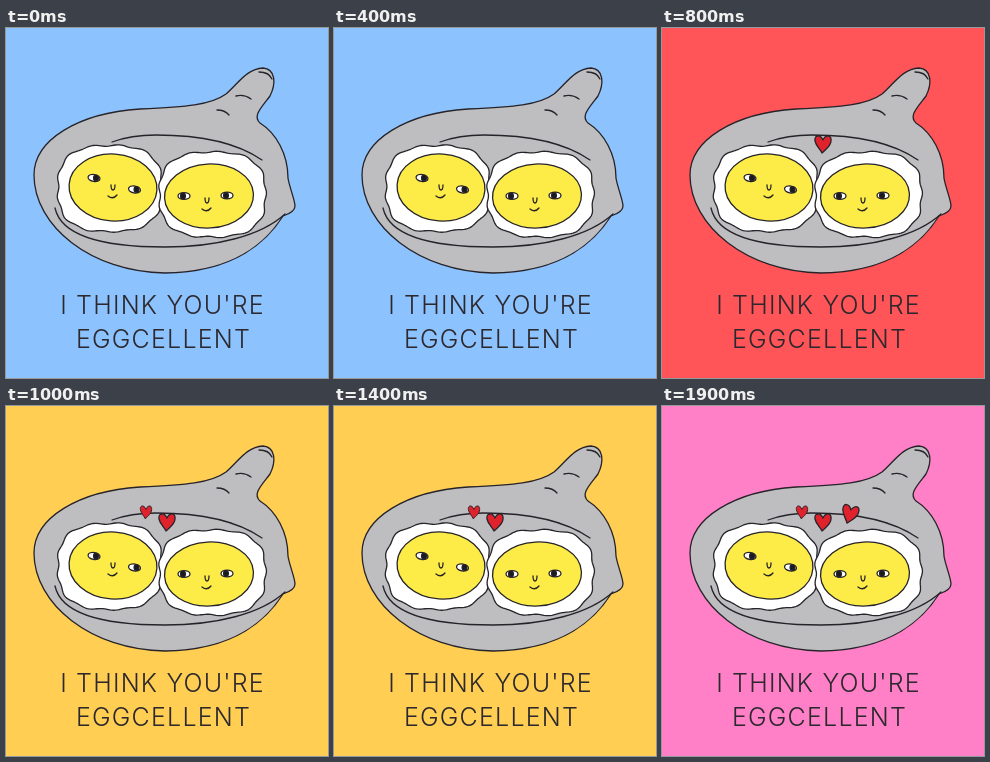
Write an HTML page that moves like this. It is 322x350 px and loops after 2000 ms.

```html
<!DOCTYPE html>
<html lang="en">
<head>
<meta charset="utf-8">
<title>Eggcellent</title>
<style>
  html, body { margin: 0; width: 100%; height: 100%; overflow: hidden; }
  svg { display: block; width: 100%; height: 100%; }
  .ink { fill: none; stroke: #262329; stroke-width: 1.3; stroke-linecap: round; stroke-linejoin: round; }
  .pan { fill: #bebec1; }
  .white { fill: #fff; }
  .yolk { fill: #fdec48; }
  .pupil { fill: #1c1a1e; }
  .heart { fill: #e0222d; }
  text { font: 300 25px Inter, Lato, sans-serif; letter-spacing: 1.2px; text-anchor: middle; fill: #2c282e; }
</style>
</head>
<body>
<svg viewBox="0 0 322 350">
  <defs>
    <path id="heart" d="M0-4C-3-10-9-9-8-3C-7 2-3 5-1 9C3 5 8 2 8-3C9-9 3-10 0-4Z"/>
  </defs>
  <rect id="backdrop" width="322" height="350"/>

  <g class="ink">
    <path class="pan" d="M28 147C28 112 72 85 134 81C180 79 205 77 220 66
      C232 56 240 41 257 40C270 41 270 56 264 68C256 79 246 88 254 95
      C270 105 282 126 282 150C283 158 289 172 289 178Q289 184 277 188
      C262 212 230 244 159 245C85 244 28 198 28 147Z"/>
    <!-- Rim and handle creases -->
    <path d="M106 114Q125 107 150 107C190 107 230 114 256 132"/>
    <path d="M49 180C56 212 110 219 159 219C210 219 255 208 279 186"/>
    <path d="M253 44Q263 44 266 51M230 68Q238 66 245 71M211 82Q219 82 223 87"/>
  </g>

  <g id="eggs" class="ink"></g>

  <g id="hearts" class="ink heart">
    <use href="#heart" transform="translate(161 116)"/>
    <use href="#heart" transform="translate(140 106) scale(.7 .76)"/>
    <use href="#heart" transform="translate(188 108) rotate(12) scale(1 1.06)"/>
  </g>

  <text x="156.500" y="286">I THINK YOU'RE</text>
  <text x="157.500" y="320">EGGCELLENT</text>
</svg>
<script>
const LOOP = 2000, SCENE = 500;
const backdrops = ['#8cc2fd', '#ff5458', '#ffce52', '#ff80c7'];
const backdrop = document.getElementById('backdrop');
const eggs = document.getElementById('eggs');
const hearts = [...document.getElementById('hearts').children];

function add(tag, attributes) {
  const node = document.createElementNS('http://www.w3.org/2000/svg', tag);
  for (const key in attributes) node.setAttribute(key, attributes[key]);
  eggs.append(node);
}

const line = d => add('path', { d });
const ellipse = (cx, cy, rx, ry, className, angle = 0) => add('ellipse',
  { cx, cy, rx, ry, class: className, transform: `rotate(${angle} ${cx} ${cy})` });

// Rounded box with a gently scalloped edge
function eggWhite(cx, cy, rx, ry, phase) {
  const squareness = 2.7, points = [];
  for (let a = 0; a < Math.PI * 2; a += Math.PI / 90) {
    const c = Math.cos(a), s = Math.sin(a);
    const radius = (Math.abs(c) ** squareness + Math.abs(s) ** squareness) ** (-1 / squareness);
    const wave = 1 + .018 * Math.sin(13 * a + phase);
    points.push([cx + rx * c * radius * wave, cy + ry * s * radius * wave]);
  }
  add('path', { d: `M${points.join('L')}Z`, class: 'white' });
}

function eye(x, y, look, angle) {
  ellipse(x, y, 6, 3.4, 'white', angle);
  ellipse(x + look, y, 2.4, 2.9, 'pupil');
}

function face(x, y, leftEye, rightEye) {
  eye(...leftEye);
  eye(...rightEye);
  line(`M${x - 2} ${y - 3}q0 5 2 5t2-5`);
  line(`M${x - 5} ${y + 8}q5 4 9-1`);
}

eggWhite(104, 160.5, 52, 43, 1);
eggWhite(206.5, 166.5, 53, 42.5, 2);
ellipse(107, 159.5, 44, 33.5, 'yolk', 4);
ellipse(203, 168, 44.500, 32, 'yolk', -3);
face(107, 160, [88, 150, 2, 10], [128.5, 161.5, 2, 10]);
face(201, 173, [178, 168, -1, 0], [221, 167.5, -1, 0]);

// Each scene changes the backdrop and reveals one more heart
function draw(time) {
  const scene = Math.floor((time % LOOP) / SCENE);
  backdrop.setAttribute('fill', backdrops[scene]);
  hearts.forEach((heart, i) => heart.setAttribute('visibility', i < scene ? 'visible' : 'hidden'));
}

const start = performance.now();
function tick() {
  draw(performance.now() - start);
  requestAnimationFrame(tick);
}
tick();
</script>
</body>
</html>
```
